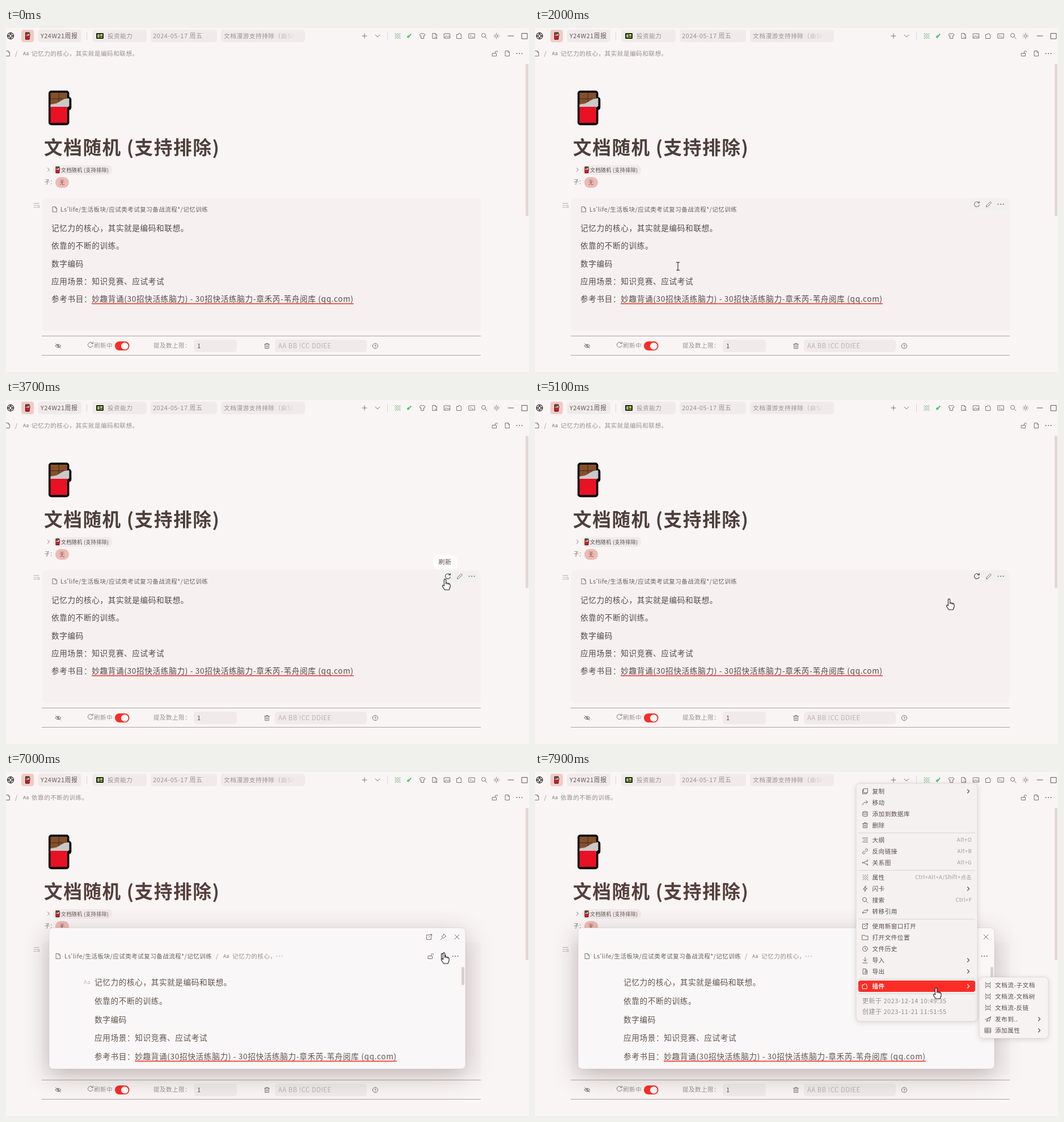
These frames come from a looping animation (922x607 px, 8000 ms). An HTML page with a canvas:

```html
<!DOCTYPE html>
<html lang="zh-CN">
<head>
<meta charset="utf-8">
<title>文档随机</title>
<style>
html, body { margin: 0; width: 100%; height: 100%; overflow: hidden; background: #f9f5f4; }
canvas { display: block; }
</style>
</head>
<body>
<canvas id="stage" width="922" height="607"></canvas>
<script>
const ctx = document.getElementById('stage').getContext('2d');
const LOOP = 8000, STEP = 100;
const FONT = '"Noto Sans CJK SC", "Noto Sans CJK", "Noto Sans", sans-serif';
const RED = '#fb2d27', GREY = '#99918f', PALE = '#b9b1af', BG = '#f9f5f4', FIELD = '#f0ebea';

const PATH = "Ls'life/生活板块/应试类考试复习备战流程*/记忆训练";
const LINES = ['记忆力的核心，其实就是编码和联想。', '依靠的不断的训练。', '数字编码', '应用场景：知识竞赛、应试考试', '参考书目：'];
const LINK = '妙趣背诵(30招快活练脑力) - 30招快活练脑力-章禾芮-苇舟阅库 (qq.com)';

// Icons are centred on the origin and about ten pixels wide.
const circle = r => `M${r} 0A${r} ${r} 0 1 1 ${-r} 0A${r} ${r} 0 1 1 ${r} 0`;
const DOC = 'M-3.5-4.5H1L3.5-2V4.5H-3.5ZM1-4.5V-2H3.5';
const FRAME = 'M-5-4H5V4H-5Z';
const ICONS = {
  doc: DOC,
  docFind: DOC + 'M0 2H2L4 4',
  refresh: 'M4.3 1.2A4.5 4.5 0 1 1 3.6-2.7M4.3-5V-2.2H1.5',
  pencil: 'M-4.5 4.5L-4 2L2.5-4.5L4.5-2.5L-2 4Z',
  dots: 'M-4.5 0h.1M0 0h.1M4.5 0h.1',
  lock: 'M-4.5-.5H2.5V4.5H-4.5ZM.5-.5V-2.5A2 2 0 0 1 4.5-2.5',
  plus: 'M-4 0H4M0-4V4',
  down: 'M-4-2L0 2L4-2',
  right: 'M-1.5-3L1.5 0L-1.5 3',
  close: 'M-4-4L4 4M4-4L-4 4',
  minus: 'M-5 0H5',
  square: 'M-4.5-4.5H5V5H-4.5Z',
  search: 'M1.8 1.8L5 5M2.5-1A3.5 3.5 0 1 1-4.5-1A3.5 3.5 0 1 1 2.5-1',
  sun: circle(2.2) + 'M0-5V-4M0 5V4M-5 0H-4M5 0H4M-3.5-3.5L-3-3M3.5 3.5L3 3M-3.5 3.5L-3 3M3.5-3.5L3-3',
  image: FRAME + 'M-4 3L-1.5-.5L1 2L3 .5L5 3M2-2h.1',
  puzzle: 'M-4.5-2.5H-2A2 2 0 0 1 2-2.5H3V0A2 2 0 0 1 3 3V4.5H-4.5Z',
  terminal: FRAME + 'M-2.5-1.5L-1 0L-2.5 1.5M.5 1.8H2.5',
  shirt: 'M-2-4.5L-5-2.5L-3.8 0L-2.5-.6V4.5H2.5V-.6L3.8 0L5-2.5L2-4.5Q0-2.5-2-4.5',
  hash: 'M-4-1.7H5M-5 1.7H4M-1-5L-2.5 5M2.5-5L1 5',
  eyeOff: 'M-5 0Q0-6 5 0Q0 6-5 0M-4.5-4L4.5 4' + circle(1.5),
  trash: 'M-4.5-3H4.5M-3.3-3V4.5H3.3V-3M-1.5-3V-4.5H1.5V-3M-1-.5V2.5M1-.5V2.5',
  help: circle(4.6) + 'M-1.3-1A1.3 1.3 0 1 1 0 .6V1M0 2.5h.1',
  list: 'M-5-3.5H4M-5 0H-1M-5 3.5H-1M4.5 1.5A1.8 1.8 0 1 1 1 1.5A1.8 1.8 0 1 1 4.5 1.5M4 3L5 4',
  copy: 'M-2.5-4.5H4.5V2.5H-2.5ZM-2.5-2.5H-4.5V4.5H2.5V2.5',
  move: 'M-4.5 4Q-4-1 4-1M1.5-4L4.5-1L1.5 2',
  data: 'M-4-3Q0-6 4-3V3.5Q0 6-4 3.5ZM-4-3Q0 0 4-3M-4 .5Q0 3 4 .5',
  bars: 'M-4.5-3.5H4.5M-3 0H4.5M-4.5 3.5H4.5',
  link: 'M-1 1L1-1M0-3L2-4.5Q5-4 4.5-2L2 1M0 3L-2 4.5Q-5 4-4.5 2L-2-1',
  key: 'M-3.5 1.5L-2 3L0 1L-1.5-.5ZM0 0L3-3L1.5-2.5',
  graph: 'M4-3.5L-3.5 0L4 3.5M4-5v3M-4.5-1v2M4 2v3',
  checks: 'M-4-4h1M0-4h1M4-4h1M-2-2h1M2-2h1M-4 0h1M0 0h1M4 0h1M-2 2h1M2 2h1M-4 4h1M0 4h1M4 4h1',
  bolt: 'M1-5L-3.5 1H0L-1 5L3.5-1H0Z',
  swap: 'M-5 2H2M-3 0L-5 2L-3 4M5-2H-2M3-4L5-2L3 0',
  open: 'M0-3.5H-4.5V4.5H3.5V0M1-4.5H4.5V-1M4.5-4.5L-1 1',
  folder: 'M-5-4H-1L0-2.5H5V4H-5Z',
  history: circle(4.4) + 'M0-2.5V.5L2 1.5',
  pull: 'M0-5V2M-3-1L0 2L3-1M-4 5H4',
  push: DOC + 'M-1.5 1H2M.5-1L2.5 1L.5 3',
  flow: 'M-4-5V-2.5H4V-5M-4 5V2.5H4V5M-5 0H-3M-1 0H1M3 0H5',
  send: 'M-5 1L5-4L2.5 4L-.5 2L-2 5L-2 1.5L5-4',
  table: FRAME + 'M-5-1H5M-5 1.5H5M-1.5-4V4',
  pin: 'M1-5L5-1L2.5 0L0 3L-3-.5L0-2.5ZM-1.5 1.5L-5 5',
  ring: circle(5.5) + circle(2.6) + 'M0-5V-3M0 3V5M-5 0H-3M3 0H5',
};
for (const k in ICONS) ICONS[k] = new Path2D(ICONS[k]);

function icon(name, x, y, color = '#7a7270', width = 1) {
  ctx.save();
  ctx.translate(x, y);
  ctx.strokeStyle = color;
  ctx.lineWidth = name === 'dots' ? 2 : width;
  ctx.lineCap = ctx.lineJoin = 'round';
  ctx.stroke(ICONS[name]);
  ctx.restore();
}

function rect(x, y, x2, y2, r, fill) {
  ctx.fillStyle = fill;
  ctx.beginPath();
  ctx.roundRect(x, y, x2 - x, y2 - y, r);
  ctx.fill();
}

// y is the vertical centre; pitch is the advance of one Chinese character.
function text(s, x, y, pitch, color, align = 'left', weight = 300) {
  const size = pitch * 0.955;
  ctx.font = `${weight} ${size}px ${FONT}`;
  ctx.letterSpacing = pitch * 0.045 + 'px';
  ctx.textAlign = align;
  ctx.fillStyle = color;
  ctx.fillText(s, x, y + size * 0.37);
  return ctx.measureText(s).width;
}

function panel(x, y, x2, y2, fill, blur, drop, alpha) {
  ctx.save();
  ctx.shadowColor = `rgba(70,50,46,${alpha})`;
  ctx.shadowBlur = blur;
  ctx.shadowOffsetY = drop;
  rect(x, y, x2, y2, 7, fill);
  ctx.restore();
  ctx.strokeStyle = 'rgba(90,70,65,.12)';
  ctx.lineWidth = 1;
  ctx.stroke();
}

function faded(alpha, draw) {
  if (alpha <= 0) return;
  ctx.save();
  ctx.globalAlpha = alpha;
  draw();
  ctx.restore();
}

function polygon(fill, ...p) {
  ctx.fillStyle = fill;
  ctx.beginPath();
  for (let i = 0; i < p.length; i += 2) ctx.lineTo(p[i], p[i + 1]);
  ctx.fill();
}

function chocolate(x, y, scale) {
  ctx.save();
  ctx.translate(x, y);
  ctx.scale(scale, scale);
  rect(0, 0.5, 36.5, 61.5, 5, '#050303');
  rect(25, 11.5, 40.3, 35, 5, '#050303');
  rect(3.5, 4, 33, 30, 1, '#83502c');
  ctx.fillStyle = '#5b331d';
  ctx.fillRect(17.5, 4, 1.5, 22);
  ctx.fillRect(4, 14, 28, 1.5);
  polygon('#cbc9c9', 3.5, 25, 14, 23, 28, 15, 36.5, 14, 36.5, 28, 33, 30, 3.5, 30);
  rect(3.5, 29, 33, 57.5, 1, '#e81224');
  ctx.restore();
}

const CURSORS = {
  hand: new Path2D('M-1.6 12V1.5A1.6 1.6 0 0 1 1.6 1.5V6.5L7 7.8Q9 8.5 9 10.5V14L7 19H-.5L-4.5 13Q-5 10.5-3 10.8Z'),
  arrow: new Path2D('M0 0V15L3.5 12L6 17.5L8.4 16.4L6 11H10.5Z'),
  beam: new Path2D('M-3-7Q0-7.5 0-5.5Q0-7.5 3-7M0-5.5V5.5M-3 7Q0 7.5 0 5.5Q0 7.5 3 7'),
};

const MOVES = [
  [400, 914, 66, 'arrow'], [500, 908, 94, 'arrow'], [600, 861, 183, 'arrow'], [700, 804, 260, 'arrow'],
  [800, 710, 340, 'beam'], [900, 590, 390, 'beam'], [1200, 436, 290, 'beam'], [1300, 334, 290, 'beam'],
  [1600, 300, 350, 'beam'], [2100, 240, 438, 'beam'], [2200, 212, 545, 'hand'], [2400, 214, 544, 'beam'],
  [2700, 700, 352, 'hand'], [2800, 774, 316, 'hand'], [5000, 774, 316, 'hand'], [5100, 730, 351, 'hand'],
  [5200, 600, 372, 'beam'], [5400, 389, 385, 'beam'], [5600, 389, 385, 'beam'], [5900, 353, 366, 'beam'],
  [6000, 335, 320, 'hand'], [6200, 335, 320, 'hand'], [6400, 565, 485, 'beam'], [6800, 735, 345, 'arrow'],
  [6900, 772, 319, 'hand'], [7400, 772, 319, 'hand'], [7600, 738, 345, 'hand'], [7800, 707, 381, 'hand'],
];

// Piecewise linear value over [time, value] pairs.
function track(t, keys) {
  let prev = keys[0];
  for (const k of keys) {
    if (k[0] > t) return t < prev[0] ? prev[1] : prev[1] + (k[1] - prev[1]) * (t - prev[0]) / (k[0] - prev[0]);
    prev = k;
  }
  return prev[1];
}

function pointer(t) {
  const current = MOVES.filter(m => m[0] <= t).pop();
  return current && {
    x: track(t, MOVES),
    y: track(t, MOVES.map(m => [m[0], m[2]])),
    kind: current[3],
  };
}

function drawPointer({ x, y, kind }) {
  ctx.save();
  ctx.translate(x, y);
  ctx.lineJoin = 'round';
  const shape = CURSORS[kind];
  if (kind === 'beam') {
    ctx.lineWidth = 3;
    ctx.strokeStyle = '#fff';
    ctx.stroke(shape);
  } else {
    ctx.fillStyle = '#fff';
    ctx.fill(shape);
  }
  ctx.lineWidth = 1.1;
  ctx.strokeStyle = '#1b1919';
  ctx.stroke(shape);
  if (kind === 'hand') ctx.stroke(new Path2D('M1.6 6.5V9M4.2 7.5V9.5M6.7 8V10'));
  ctx.restore();
}

function topBar() {
  icon('ring', 8, 14, '#2d2928', 1.3);
  rect(27, 3, 49, 25, 4, '#f0cbc6');
  chocolate(34, 7.5, 0.21);
  for (const [a, b] of [[56, 133], [152, 248], [255, 372], [379, 527]]) rect(a, 3, b, 25, 5, FIELD);
  text('Y24W21周报', 61, 14, 11.4, '#665b59');
  text('投资能力', 179, 14, 11.1, GREY);
  text('2024-05-17 周五', 259, 14, 11.5, GREY);
  const fade = ctx.createLinearGradient(470, 0, 512, 0);
  fade.addColorStop(0, GREY);
  fade.addColorStop(1, FIELD);
  ctx.save();
  ctx.beginPath();
  ctx.rect(379, 3, 127, 22);
  ctx.clip();
  text('文档漫游支持排除（由SC', 384, 14, 11.2, fade);
  ctx.restore();
  rect(159, 9, 172, 19, 1, '#20231c');
  rect(161, 11, 165, 17, 0, '#8fc05a');
  rect(166, 11, 170, 14, 0, '#e4d64c');
  rect(166, 15, 170, 17, 0, '#8fc05a');
  ctx.fillStyle = '#ddd5d3';
  ctx.fillRect(142, 7, 1, 14);
  ctx.fillRect(672, 7, 1, 14);
  icon('plus', 632, 14);
  icon('down', 655, 14);
  icon('checks', 690, 14, '#4a9a62', 1.2);
  icon('key', 711, 14, '#2cc04f', 1.4);
  ['shirt', 'docFind', 'image', 'puzzle', 'terminal', 'search', 'sun']
    .forEach((name, i) => icon(name, 734 + i * 21.8, 14));
  icon('minus', 890, 14, '#5b5553');
  icon('square', 914, 14, '#5b5553');
}

function crumbBar(late) {
  icon('doc', 3, 45);
  text('/', 16, 45, 11, GREY);
  text('Aa', 30, 45, 8.6, '#6f6765');
  text(LINES[late ? 1 : 0], 45, 45, 11.1, GREY);
  icon('lock', 862, 45);
  icon('doc', 884, 45);
  icon('dots', 905, 45);
}

function noteLines(x, y, step, ink) {
  LINES.forEach((line, i) => {
    const rowY = y + i * step;
    const width = text(line, x, rowY, 14.25, ink);
    if (i < 4) return;
    const w = text(LINK, x + width, rowY, 14.3, ink);
    ctx.fillStyle = RED;
    ctx.fillRect(x + width, rowY + 7.5, w, 1.6);
  });
}

function footer(ink) {
  ctx.fillStyle = '#aaa4a3';
  ctx.fillRect(63, 543, 774, 1);
  ctx.fillRect(63, 577, 774, 1);
  icon('eyeOff', 92, 561);
  icon('refresh', 149, 559);
  text('刷新中', 155, 560, 11, GREY);
  rect(192, 553, 217.5, 569, 8, RED);
  rect(203, 555, 215.5, 567.5, 7, '#fff');
  text('提及数上限：', 260, 560, 11, GREY);
  rect(331, 550, 407, 572, 5, FIELD);
  text('1', 337, 561, 11.5, ink);
  icon('trash', 460, 561);
  rect(474, 550, 636, 572, 5, FIELD);
  text('AA BB !CC DDIEE', 480, 561, 11.8, PALE);
  icon('help', 651, 561);
}

function page(t, late, ink) {
  topBar();
  crumbBar(late);
  rect(916, 63, 921, 332, 2, '#e4d7d5');
  chocolate(75, 110, 1);
  faded(track(t, [[1000, 0], [1200, 0.5], [1300, 0.75], [1600, 0]]), () => {
    icon('doc', 52, 210, GREY);
    icon('hash', 146, 155, GREY);
    text('添加标签', 156, 155, 11.1, GREY);
    icon('image', 223, 155, GREY);
    text('添加题头图', 232, 155, 11.1, GREY);
  });
  text('文档随机 (支持排除)', 67, 211, 34.2, late ? '#553f3c' : '#4e3f3c', 'left', 700);
  icon('right', 75, 250);
  rect(83, 242, 187, 259, 8, FIELD);
  chocolate(87.5, 244.5, 0.19);
  text('文档随机 (支持排除)', 97, 250.5, 9.4, ink);
  text('子：', 68, 272, 9.5, '#6f6765');
  rect(87, 263, 111, 282, 9, '#efbab4');
  text('无', 99, 272.5, 9, '#6b4a46', 'center');

  icon('list', 54, 313, PALE);
  rect(64, 300, 837, 535, 7, '#f6f1f0');
  icon('doc', 86, 320);
  text(PATH, 96, 320, 11, '#6a605e');
  noteLines(80, 353, 31.3, ink);
  const tools = [[700, 0], [900, 1], [1000, 1], [1200, 0.22], [1300, 0], [1500, 0], [2000, 1], [6100, 1], [6200, 0]];
  faded(track(t, tools), () => {
    if (!late) rect(768, 302, 832, 321, 5, '#f1eff0');
    icon('refresh', 779, 311, t >= 2700 && !late ? '#3f3b3a' : '#7b7371', 1.1);
    icon('pencil', 800, 311, '#7b7371');
    icon('dots', 821, 311, '#7b7371');
  });
  if (t >= 3200 && t < 5100) {
    rect(753, 274, 795, 298, 6, '#fdfcfc');
    text('刷新', 774, 286, 11.5, '#5d5250', 'center');
  }
  footer(ink);
}

function popover(t, ink) {
  panel(76, 275, 810, 524, '#f9f7f7', 44, 12, 0.3);
  icon('open', 746, 291);
  icon('pin', 771, 291);
  icon('close', 795, 291);
  icon('doc', 92, 325);
  text(PATH, 103, 325, 11, '#6a605e');
  text('/', 370, 325, 11, GREY);
  text('Aa', 383, 325, 8.6, '#6f6765');
  text('记忆力的核心，', 399, 325, 11.1, GREY);
  faded(0.5, () => icon('dots', 482, 325, GREY));
  icon('lock', 749, 325);
  icon('doc', 771, 325, t >= 6900 ? '#2d2928' : '#6f6765', 1.2);
  icon('dots', 792, 325);
  rect(803, 344, 808, 376, 2, '#d8d1d0');
  if (t < 7200) text('Aa', 137, 371, 9.5, PALE);
  noteLines(156, 371, 32.75, ink);
}

const MENU = [
  'copy|复制|>', 'move|移动', 'data|添加到数据库', 'trash|删除', '-',
  'bars|大纲|Alt+O', 'link|反向链接|Alt+B', 'graph|关系图|Alt+G', '-',
  'checks|属性|Ctrl+Alt+A/Shift+点击', 'bolt|闪卡|>', 'search|搜索|Ctrl+F', 'swap|转移引用', '-',
  'open|使用新窗口打开', 'folder|打开文件位置', 'history|文件历史', 'pull|导入|>', 'push|导出|>', '-',
  'puzzle|插件|>', '-',
];
const SUBMENU = ['flow|文档流-子文档', 'flow|文档流-文档树', 'flow|文档流-反链', 'send|发布到..|>', 'table|添加属性|>'];

// Returns the label of the row at height hoverY.
function menuRows(rows, left, right, y, hoverY) {
  let hovered = '';
  for (const row of rows) {
    if (row === '-') {
      ctx.fillStyle = '#dcd6d5';
      ctx.fillRect(left + 4, y - 7, right - left - 8, 1);
      y += 6;
      continue;
    }
    const [name, label, extra] = row.split('|');
    const active = Math.abs(hoverY - y) < 10;
    if (active) {
      hovered = label;
      rect(left + 4, y - 10, right - 4, y + 10, 4, RED);
    }
    icon(name, left + 16, y, active ? '#fff' : '#6f6765');
    text(label, left + 28.5, y, 11.1, active ? '#fff' : '#5a4f4d', 'left', active ? 700 : 300);
    if (extra === '>') icon('right', right - 16, y, active ? '#fff' : '#5a4f4d', 1.2);
    else if (extra) text(extra, right - 10, y, 9.8, '#a29997', 'right');
    y += 20;
  }
  return hovered;
}

function menus(cursor) {
  panel(566, 20, 780, 440, '#f4f1f0', 10, 2, 0.16);
  const hovered = menuRows(MENU, 566, 780, 34, cursor.y);
  text('更新于 2023-12-14 10:49:35', 577, 404, 11.5, GREY);
  text('创建于 2023-11-21 11:51:55', 577, 423, 11.5, GREY);
  if (hovered !== '插件') return;
  panel(783, 362, 905, 470, '#f6f3f2', 10, 2, 0.16);
  menuRows(SUBMENU, 782.5, 905, 376, -99);
}

function draw(t) {
  const late = t >= 5600;
  const ink = late ? '#64544f' : '#544b49';
  const cursor = pointer(t);
  ctx.fillStyle = BG;
  ctx.fillRect(0, 0, 922, 607);
  page(t, late, ink);
  if (t >= 6200) popover(t, ink);
  if (t >= 7200) menus(cursor);
  if (cursor) drawPointer(cursor);
}

function tick(now) {
  draw(Math.floor(now % LOOP / STEP) * STEP);
  requestAnimationFrame(tick);
}
draw(0);
requestAnimationFrame(tick);
</script>
</body>
</html>
```
